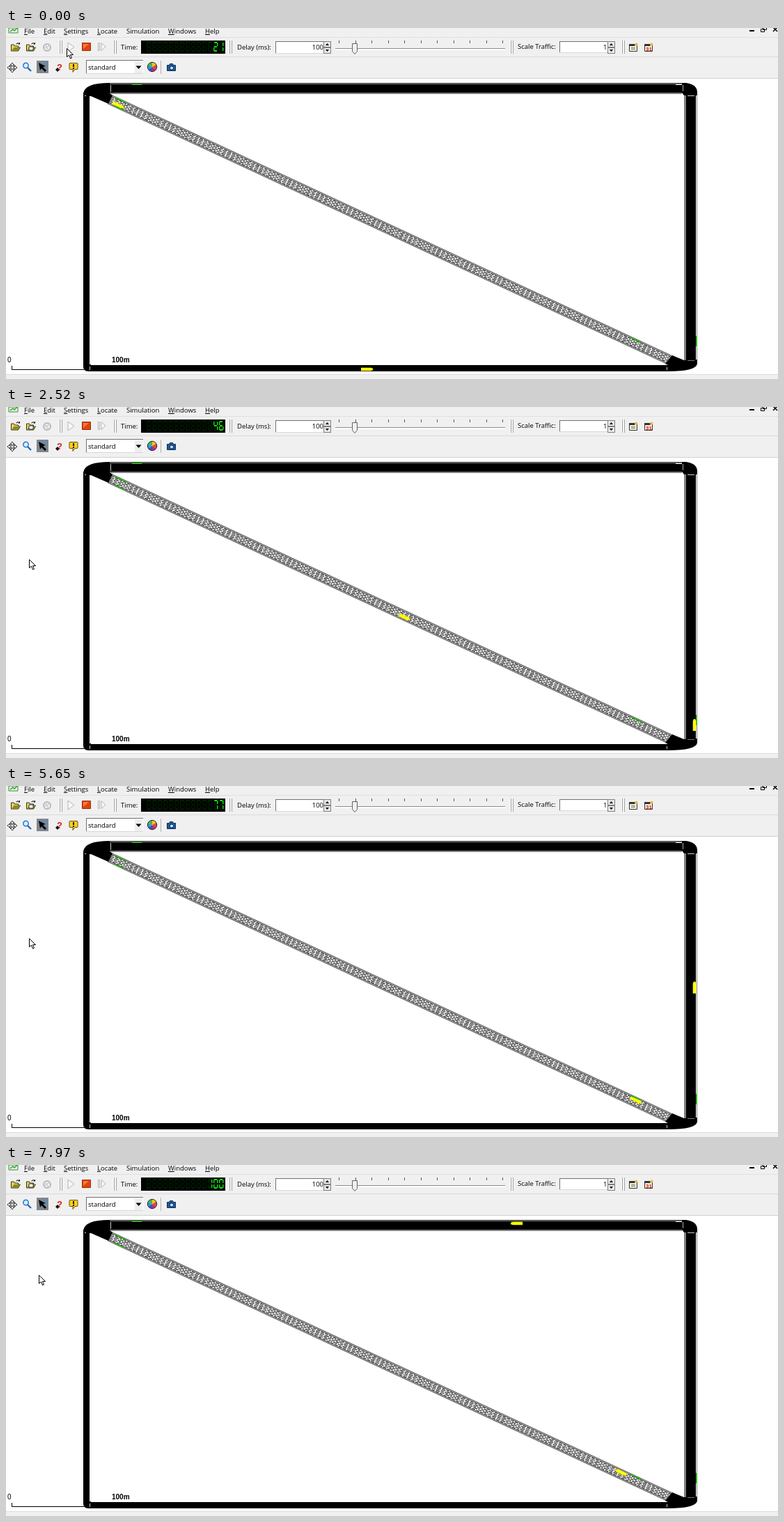
Write an HTML page with a canvas that moves like this. It is 1109x505 px and loops after 8 s.

```html
<!DOCTYPE html>
<html lang="en">
<head>
<meta charset="utf-8">
<title>Traffic simulation</title>
<style>
html, body { margin: 0; width: 100%; height: 100%; overflow: hidden; background: #fff; }
canvas { display: block; }
</style>
</head>
<body>
<canvas id="stage" width="1109" height="505"></canvas>
<script>
const LOOP = 8000, W = 1109, H = 505;
const stage = document.getElementById('stage').getContext('2d');
const backdrop = document.createElement('canvas');
backdrop.width = W;
backdrop.height = H;
let g = backdrop.getContext('2d');

// ---------- drawing helpers ----------
function rect(x, y, w, h, color) {
  g.fillStyle = color;
  g.fillRect(x, y, w, h);
}
function shape(d, fill, stroke, width = 1) {
  const p = new Path2D(d);
  if (fill) { g.fillStyle = fill; g.fill(p); }
  if (stroke) { g.strokeStyle = stroke; g.lineWidth = width; g.stroke(p); }
}
function circle(x, y, r, fill, stroke, width) {
  shape(`M${x - r} ${y}a${r} ${r} 0 1 0 ${2 * r} 0a${r} ${r} 0 1 0 ${-2 * r} 0`, fill, stroke, width);
}
function text(s, x, y, { font = '9.5px "Open Sans", sans-serif', align = 'left', color = '#000' } = {}) {
  g.font = font;
  g.textAlign = align;
  g.fillStyle = color;
  g.fillText(s, x, y);
}
function field(x, y, w, h) {
  rect(x, y, w, h, '#fff');
  rect(x, y, w, 1, '#707070');
  rect(x, y, 1, h, '#707070');
  rect(x, y + h - 1, w, 1, '#d8d8d8');
}
function grip(x, y = 18) {
  for (const dx of [0, 3]) {
    rect(x + dx, y, 1, 19, '#fff');
    rect(x + dx + 1, y, 1, 19, '#a0a0a0');
  }
}
function spinner(x) {
  for (const [y, d] of [[19, -1], [28, 1]]) {
    rect(x, y, 11, 9, '#e8e8e8');
    g.strokeStyle = '#808080';
    g.lineWidth = 1;
    g.strokeRect(x + .5, y + .5, 10, 8);
    shape(`M${x + 3} ${y + 4.5 - d * 1.5}h5l-2.5 ${d * 3}z`, '#000');
  }
}

// ---------- window chrome ----------
function drawMenu() {
  shape('M4 0h13v7h-13z', '#e8f5e0', '#3d8a3d');
  shape('M6 5l4 -3 2 2 4 -4', null, '#2f9e3f', 1.5);
  const items = { File: 26, Edit: 54, Settings: 83, Locate: 131, Simulation: 173, Windows: 233, Help: 286 };
  for (const [label, x] of Object.entries(items)) {
    text(label, x, 7.5);
    if (label !== 'Simulation') rect(x, 9, g.measureText(label[0]).width, 1, '#000');
  }
  rect(1068, 3, 7, 2, '#000');
  shape('M1087.5 0v2.5h5v-3M1085.5 1.5h4v4h-5v-4z', null, '#000');
  shape('M1102 -1l6 6M1108 -1l-6 6', null, '#000', 1.5);
}
function folder(x) {
  shape(`M${x} 33v-9h4l1 2h5v2h3l-3 5z`, '#e9d35a', '#33330c');
  shape(`M${x + 1} 32l3 -4h9l-3 4z`, '#8a8a20');
  shape(`M${x + 7} 23q3 -3 5 0l-2 0m2 0v-2`, null, '#000');
}
function drawMainBar() {
  folder(7.5);
  folder(29.5);
  shape('M33 27h6v5h-6z', '#fff', '#333');
  circle(59, 28, 5, null, '#b8b8b8', 2);
  shape('M54 30l9 -5M56 24l5 8', null, '#cfcfcf', 1.5);
  grip(76);
  shape('M89 21l9 6.500l-9 6.500z', '#f8f8f8', '#b4b4b4');
  shape('M109.500 21.500h12v11h-12z', '#e2430c', '#96300f');
  shape('M111 23h8l-8 7z', '#f47a3a');
  shape('M132.500 21.500h2v11h-2zM137 21.500l6 5.500l-6 5.500z', '#f8f8f8', '#b4b4b4');
  grip(154);
  text('Time:', 165, 30.500);
  rect(194, 18, 121, 19, '#000');
  grip(320);
  text('Delay (ms):', 332, 30.500);
  field(387, 19, 69, 18);
  text('100', 456, 31, { align: 'right' });
  spinner(456);
  for (let i = 0; i < 11; i++) rect(Math.round(478 + i * 23.5), 18, 1, 4, '#555');
  rect(473, 29, 244, 1, '#8a8a8a');
  rect(473, 30, 244, 2, '#fff');
  shape('M497.500 22.500h7v11l-3.500 4l-3.500 -4z', '#f0f0f0', '#606060');
  grip(724);
  text('Scale Traffic:', 735, 30);
  field(795, 19, 69, 17);
  text('1', 863.500, 31, { align: 'right' });
  spinner(864);
  grip(884);
  for (const x of [895.5, 917.5]) {
    shape(`M${x} 23.500h11v10h-11z`, '#f4f0d8', '#333');
    rect(x, 23, 8, 3, '#333');
    circle(x + 10, 23.500, 2, '#f4b83c');
  }
  rect(898, 28, 6, 1, '#777');
  rect(898, 30, 6, 1, '#777');
  text('31', 919, 33, { font: 'bold 8px "Liberation Sans", sans-serif', color: '#d01818' });
}
function drawViewBar() {
  shape('M9 50l3 3.500h-2v2.500h2.500v-2l3.500 3l-3.500 3v-2h-2.500v2.500h2l-3 3.500l-3 -3.500h2v-2.500h-2.500v2l-3.500 -3l3.500 -3v2h2.500v-2.500h-2z', '#fff', '#222');
  circle(28.5, 54, 3.7, '#d8efff', '#2878d0', 1.5);
  shape('M31 57l5 5', null, '#2060b8', 2.2);
  rect(44, 47, 17, 18, '#7d8790');
  shape('M47 50l10 5l-4 1l5 5l-2 2l-5 -5l-2 3z', '#000');
  circle(57, 52, 2, '#4a90d8');
  shape('M71 60l3 -3l3 3l-3 3z', '#111');
  text('?', 73, 61, { font: 'bold 13px "Liberation Sans", sans-serif', color: '#d42010' });
  shape('M92 50.500h10q1 0 1 1v7q0 1 -1 1h-3l-3 4v-4h-4q-1 0 -1 -1v-7q0 -1 1 -1z', '#ffcf20', '#6a5208');
  rect(96, 52, 2, 4, '#000');
  rect(96, 57, 2, 2, '#000');
  field(115, 46, 82, 20);
  text('standard', 118, 60);
  rect(185, 48, 11, 17, '#eee');
  shape('M186.500 54.500h8l-4 4.500z', '#000');
  ['#f0c820', '#e05020', '#c82878', '#3c50d0', '#28a0c0', '#48b838'].forEach((color, i) => {
    const a = i * Math.PI / 3 - Math.PI / 2;
    g.beginPath();
    g.moveTo(210, 56);
    g.arc(210, 56, 6.5, a, a + Math.PI / 3);
    g.fillStyle = color;
    g.fill();
  });
  circle(210, 56, 6.7, null, '#222');
  rect(222, 47, 1, 19, '#b0b0b0');
  shape('M231.500 53.500h3l1 -2h4l1 2h3v8h-12z', '#1c5a9c', '#0c2e58');
  circle(238, 57.500, 2.6, '#cde6fa', '#06203c');
}

// ---------- road network ----------
const SLOPE = .466, TILT = Math.atan(SLOPE);

function drawDiagonal() {
  const length = 809 / Math.cos(TILT);
  g.save();
  g.translate(149, 102.8);
  g.rotate(TILT);
  rect(0, -7.4, length, 14.8, '#808080');
  rect(0, -4.9, length, 9.8, '#fff');
  g.strokeStyle = '#000';
  g.lineWidth = 1;
  [-4.2, -2.1, 0, 2.1, 4.2].forEach((y, i) => {
    g.setLineDash([5 + i % 2, 1.4]);
    g.beginPath();
    g.moveTo(0, y);
    g.lineTo(length, y);
    g.stroke();
  });
  g.setLineDash([]);
  const green = '#32b01e';
  rect(6, -6.6, 17, 2, green);
  rect(10.5, 4.6, 15, 2, green);
  rect(823, -6.6, 17, 2, green);
  g.restore();
}
function drawRoads() {
  drawDiagonal();
  rect(149, 79, 822, 16, '#808080');
  rect(149, 81, 822, 12, '#000');
  rect(149, 79, 822, 1, '#303030');
  rect(974, 97, 19, 381, '#808080');
  rect(977, 97, 14, 381, '#000');
  rect(991, 97, 1, 381, '#fff');
  rect(111, 97, 9, 389, '#000');
  rect(118, 485, 834, 9, '#000');
  shape('M149 79v15l4 3l-6 12l-25 -11h-11v-4q2 -15 38 -15z', '#000');
  shape('M971 79h6q16 2 16 14v4h-19l-3 -4z', '#000');
  shape('M993 477v6q-2 11 -42 11v-9l-4 -2l10 -12l17 7z', '#000');
  shape('M111 484v3q0 7 7 7h4v-10z', '#000');
  rect(150, 82, 1, 10, '#ccc');
  rect(962, 81, 9, 1, '#fff');
  rect(972, 82, 1, 9, '#aaa');
  rect(979, 97, 10, 1, '#ccc');
  rect(113, 97, 2, 1, '#ccc');
  rect(120, 487, 1, 5, '#ccc');
  rect(949, 488, 1, 4, '#ccc');
  rect(979, 478, 10, 1, '#777');
  rect(181, 80, 14, 2, '#32b01e');
  rect(991, 443, 2, 15, '#32b01e');
}
function drawBackdrop() {
  rect(0, 0, W, H, '#f0f0f0');
  rect(0, 13, W, 1, '#e0e0e0');
  rect(0, 41, W, 1, '#dadada');
  rect(0, 72, W, 1, '#d0d0d0');
  rect(0, 73, W, 425, '#fff');
  rect(0, 498, W, 1, '#dcdcdc');
  drawMenu();
  drawMainBar();
  drawViewBar();
  rect(8, 486, 1, 6, '#000');
  rect(8, 491, 104, 1, '#000');
  drawRoads();
  const scaleFont = '10px "Liberation Sans", sans-serif';
  text('0', 2, 481, { font: scaleFont });
  text('100m', 152, 481, { font: 'bold ' + scaleFont });
}

// ---------- timing: [first change, last change, changes, simulated seconds] ----------
const bursts = [
  [160, 400, 4], [560, 700, 3], [860, 1640, 11, 9], [1740, 1800, 2], [1960, 2200, 4],
  [2360, 2520, 3], [2660, 2900, 4], [3060, 3220, 3], [3360, 3520, 3], [3680, 3840, 3],
  [4000, 4240, 4], [4380, 4620, 4], [4780, 5020, 4], [5160, 5330, 3], [5490, 5650, 3],
  [5810, 6060, 4], [6200, 6350, 3], [6510, 6750, 4], [6920, 7050, 3], [7210, 7450, 4],
  [7600, 7970, 6, 5]
];
const changes = [{ time: 0, tick: 0 }];
let elapsed = 0;
for (const [from, to, count, seconds = count] of bursts) {
  for (let k = 0; k < count; k++) {
    const part = k / (count - 1);
    changes.push({
      time: from + (to - from) * part,
      tick: elapsed + 1 + Math.floor(part * (seconds - 1) + 1e-6)
    });
  }
  elapsed += seconds;
}

function along(keys, t) {
  const i = keys.findIndex(k => k[0] >= t);
  if (i < 0) return keys[keys.length - 1].slice(1);
  if (i === 0) return keys[0].slice(1);
  const a = keys[i - 1], b = keys[i], f = (t - a[0]) / (b[0] - a[0]);
  return a.slice(1).map((v, j) => v + (b[j + 1] - v) * f);
}

// ---------- vehicles ----------
// Pulling away: 3.9 px per tick squared up to cruising speed.
const launch = (tick, s) => [0, 1, 2, 3, 4, 5].map(n => [tick + n, s + 1.95 * n * (n + 1)]);
function track(d) {
  const path = document.createElementNS('http://www.w3.org/2000/svg', 'path');
  path.setAttribute('d', d);
  return path;
}
const cars = [
  {
    path: track('M500 491H975Q989 491 989 478V98Q989 84 972 84H100'),
    keys: [[0, 27], [18, 401.4], [22, 477], [23, 497], [24, 515], [25, 526], [26, 531],
      ...launch(46, 531), [63, 839], [67, 902], [70, 962], [79, 1149]]
  },
  {
    path: track('M153.5 107.3L952 479.4C972 488.7 972 483.5 952 474.2L500 263.6'),
    keys: [...launch(1, 17), [42, 824.3], [46, 882], [50, 927], [53, 956], [54, 966], [55, 973], [56, 976],
      ...launch(76, 976)]
  }
];
function drawCar({ path, keys }, tick) {
  const [s] = along(keys, tick);
  const front = path.getPointAtLength(s), rear = path.getPointAtLength(s - 17);
  g.save();
  g.translate(front.x, front.y);
  g.rotate(Math.atan2(front.y - rear.y, front.x - rear.x));
  shape('M-17 -2.300H-3L0 -1.200V1.200L-3 2.300H-17z', '#ff0');
  g.restore();
}

// ---------- clock and pointer ----------
const SEGMENTS = ['abcdef', 'bc', 'abged', 'abgcd', 'fgbc', 'afgcd', 'afgedc', 'abc', 'abcdefg', 'abcdfg'];
const BARS = {
  a: [1, 0, 4, 2], b: [5, 1, 1.5, 5], c: [5, 8, 1.5, 5], d: [1, 12, 4, 2],
  e: [0, 8, 1.5, 5], f: [0, 1, 1.5, 5], g: [1, 6, 4, 2]
};
function drawClock(value) {
  const digits = String(value).padStart(14, ' ');
  [...digits].forEach((ch, i) => {
    const lit = ch === ' ' ? '' : SEGMENTS[ch];
    for (const [name, [x, y, w, h]] of Object.entries(BARS)) {
      rect(195 + i * 8 + 7 + x, 20 + y, w, h, lit.includes(name) ? '#10dc10' : '#001a00');
    }
  });
}

const pointerKeys = [
  [860, 87, 29], [1180, 69, 49], [1400, 19, 140], [1640, 34, 203], [1800, 33, 219],
  [7600, 33, 219], [7970, 47, 158]
];
function drawPointer(time) {
  const [x, y] = along(pointerKeys, time).map(Math.round);
  if (x > 60 && x < 84 && y > 42 && y < 66) {
    g.strokeStyle = '#909090';
    g.lineWidth = 1;
    g.strokeRect(66.5, 47.5, 17, 17);
  }
  g.save();
  g.translate(x + .5, y + .5);
  shape('M0 0V12L3 9.500L5 14.500L7 13.500L5 9H9z', '#fff', '#000');
  g.restore();
}

function render(time) {
  const now = changes.findLast(c => c.time <= time + .01);
  g = stage;
  g.drawImage(backdrop, 0, 0);
  drawClock(21 + now.tick);
  cars.forEach(car => drawCar(car, now.tick));
  drawPointer(now.time);
}

drawBackdrop();
const start = performance.now();
function frame() {
  render((performance.now() - start) % LOOP);
  requestAnimationFrame(frame);
}
frame();
</script>
</body>
</html>
```
